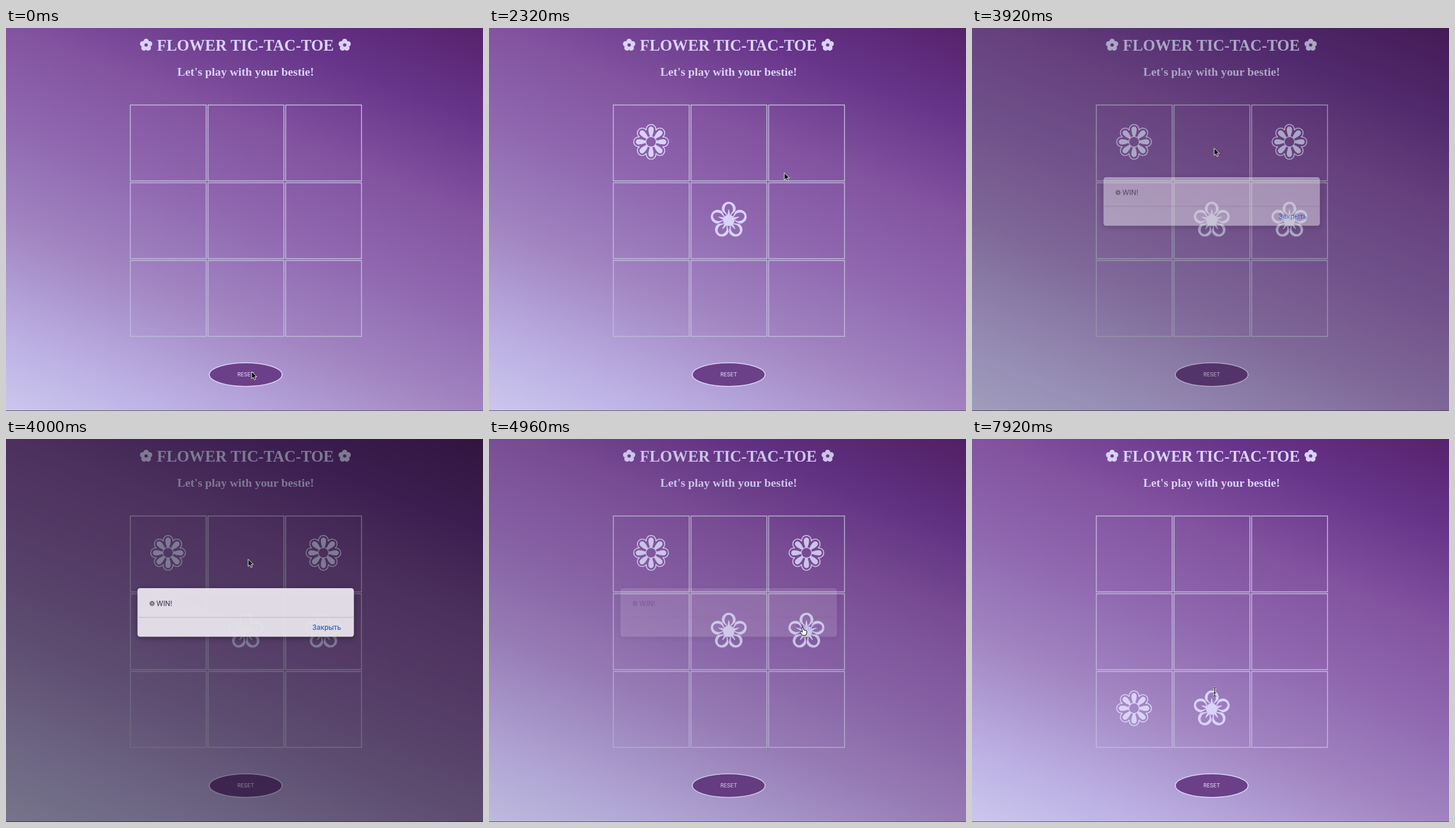
Write an HTML page that moves like this. It is 800 by 642 pixels and loops after 8 s.

```html
<!DOCTYPE html>
<html lang="en">
<head>
<meta charset="utf-8">
<title>Flower Tic-Tac-Toe</title>
<style>
  html, body { margin: 0; width: 100%; height: 100%; overflow: hidden; }
  body {
    background: linear-gradient(22deg, #cbc7ee, #bdb2e4 12%, #a184c1 33%, #9068b0 50%,
      #82539f 67%, #66348a 84%, #57226b);
  }
  svg { display: block; width: 800px; height: 642px; }
  .title { font: bold 26.4px "Liberation Serif", serif; text-anchor: middle; }
  .subtitle { font: bold 19.8px "Liberation Serif", serif; text-anchor: middle; }
  .label { font: 9px Inter, sans-serif; text-anchor: middle; }
  .message { font: 11.5px Inter, sans-serif; }
  .close { font: 500 11.5px Inter, sans-serif; text-anchor: end; }
  #panel { filter: drop-shadow(0 2px 4px rgba(0, 0, 0, .45)); }
</style>
</head>
<body>
<svg viewBox="0 0 800 642">
  <defs>
    <g id="florette"></g>
    <g id="daisy"><circle r="8.8" fill="none" stroke="currentColor" stroke-width="1.5"/></g>
    <g id="blossom"><circle r="9.6"/></g>
  </defs>

  <g fill="#d9d2fa" color="#d9d2fa">
    <use href="#florette" x="235" y="28.5"/>
    <text class="title" x="401.5" y="38">FLOWER TIC-TAC-TOE</text>
    <use href="#florette" x="568" y="28.5"/>
    <text class="subtitle" x="402" y="80">Let's play with your bestie!</text>
    <g id="grid" fill="none" stroke="#bfbad9" stroke-width="1.5"></g>
    <g id="marks"></g>
  </g>

  <ellipse cx="402" cy="581" rx="61" ry="19.7" fill="#6b4088" stroke="#d9d2fa" stroke-width="1.6"/>
  <text class="label" x="402" y="584.3" fill="#e6dffb">RESET</text>
  <rect y="641" width="800" height="1" fill="#5c5469"/>

  <rect id="dim" width="800" height="642" fill-opacity=".42"/>
  <g id="panel">
    <rect x="220.5" y="250" width="363" height="81.5" rx="4.5" fill="#efebf2" fill-opacity=".92"/>
    <path d="M220.5 299H583.5" stroke="#b9b3bf"/>
    <use href="#daisy" transform="translate(245 275.7) scale(.155)" fill="#372a44" color="#372a44"/>
    <text class="message" x="252.3" y="279.8" fill="#372a44">WIN!</text>
    <text class="close" x="562" y="320" fill="#1f62de">Закрыть</text>
  </g>

  <g id="cursor">
    <path id="arrow" d="M0 0V13L3 10.3 5 15 7.4 14 5.4 9.4H9.4Z" transform="scale(.92)" stroke="#fff"/>
    <path id="hand" d="M-1.2 0Q0-1.3 1.2 0L2 4 6 5Q7.5 6 7 9L5.5 13H-.5L-4.3 7.6Q-4.4 6 -2.8 6.3L-.6 8Z"
      fill="#fff" stroke="#000"/>
    <g id="beam" fill="none">
      <path id="stem" d="M-3-7Q0-7 0-5Q0-7 3-7M0-5V6M-3 7Q0 7 0 5Q0 7 3 7M-2 1.5H2" stroke="#fff" stroke-width="3"/>
      <use href="#stem" style="filter: brightness(0)" transform="scale(.9)" opacity="0"/>
      <path d="M-3-7H3M0-7V7M-3 7H3M-2 1.5H2" stroke="#000" stroke-width="1.2"/>
    </g>
  </g>
</svg>
<script>
const $ = id => document.getElementById(id);
const LOOP = 8000, STEP = 80, TRAVEL = 640, PITCH = 130.3;
const ALERT = { open: 3840, close: 4800, gone: 5040 };
const RESET_AT = 6080;

function add(parent, tag, attrs) {
  const node = document.createElementNS("http://www.w3.org/2000/svg", tag);
  for (const key in attrs) node.setAttribute(key, attrs[key]);
  return parent.appendChild(node);
}

function ring(id, count, d, attrs = {}) {
  for (let i = 0; i < count; i++)
    add($(id), "path", { d, transform: `rotate(${i * 360 / count})`, ...attrs });
}

// Petal pointing up: narrow at the base, round at the tip.
function petal(base, baseWidth, belly, width, tip) {
  const shoulder = (base + belly) / 2;
  return `M${-baseWidth}-${base}C${-width * .8}-${shoulder} ${-width}-${shoulder} ${-width}-${belly}` +
    `A${width} ${tip - belly} 0 0 1 ${width}-${belly}` +
    `C${width}-${shoulder} ${width * .8}-${shoulder} ${baseWidth}-${base}Z`;
}

ring("florette", 5, petal(1, .5, 6.2, 4.5, 10.6));
add($("florette"), "circle", { r: 2.8, fill: "#713f91" });

ring("daisy", 8, petal(9, 2, 21, 4.4, 25.6));
ring("daisy", 8, "M-8-19.4A8.15 8.15 0 1 1 8-19.4", { fill: "none", stroke: "currentColor", "stroke-width": 1.5 });

ring("blossom", 5, petal(9, 4, 19.5, 11.6, 31) + petal(9, 2, 19, 7, 27.5), { "fill-rule": "evenodd" });
ring("blossom", 5, "M-2.2-8L-.6-18H.6L2.2-8Z");

const cellCenter = cell => [271.8 + cell % 3 * PITCH, 191.5 + Math.floor(cell / 3) * PITCH];

for (let cell = 0; cell < 9; cell++) {
  const [x, y] = cellCenter(cell);
  add($("grid"), "rect", { x: x - 63.3, y: y - 62.4, width: 127.2, height: 127.2 });
}

// Each round alternates the two flowers at a steady pace.
const rounds = [
  { cells: [0, 4, 2, 5, 1], start: 1280, pace: 640, end: RESET_AT },
  { cells: [6, 7], start: 6800, pace: 720, end: LOOP }
];
const marks = rounds.flatMap(({ cells, start, pace, end }) => cells.map((cell, i) => {
  const [x, y] = cellCenter(cell);
  const click = start + i * pace;
  const from = click < ALERT.open ? click : Math.max(click, ALERT.gone);
  const node = add($("marks"), "use", { href: i % 2 ? "#blossom" : "#daisy", x, y: i % 2 ? y + .5 : y - .7 });
  return { x, y, click, from, end, node };
}));

const button = { x: 412, y: 576 };
const visits = [
  { t: 0, ...button },
  ...marks.map(({ x, y, click }) => ({ t: click, x: x + 4, y: y + 10 })),
  { t: 4720, x: 526, y: 316 },
  { t: RESET_AT, ...button },
  { t: 6400, x: 380, y: 441 },
  { t: 7920, x: 407, y: 424, travel: 160 }
].sort((a, b) => a.t - b.t);

const clamp = v => Math.min(1, Math.max(0, v));
const smooth = p => p * p * (3 - 2 * p);

function cursorAt(t) {
  const i = visits.findIndex(visit => visit.t > t);
  if (i < 0) return visits[visits.length - 1];
  const a = visits[i - 1], b = visits[i];
  const leave = Math.max(a.t, b.t - (b.travel || TRAVEL));
  const p = smooth(clamp((t - leave) / (b.t - leave)));
  return { x: a.x + (b.x - a.x) * p, y: a.y + (b.y - a.y) * p };
}

function draw(t) {
  const { x, y } = cursorAt(t);
  const alertLevel = clamp((t - ALERT.open) / 160) * clamp(1 - (t - ALERT.close) / 190);
  let kind = "arrow";
  for (const mark of marks) {
    const shown = t >= mark.from && t < mark.end;
    mark.node.style.display = shown ? "" : "none";
    if (shown && Math.hypot(x - mark.x, y - mark.y) < 30) kind = "beam";
  }
  if (alertLevel > 0) kind = x > 510 ? "hand" : "arrow";

  $("dim").setAttribute("opacity", alertLevel);
  $("panel").setAttribute("opacity", alertLevel);
  for (const id of ["arrow", "hand", "beam"]) $(id).style.display = id === kind ? "" : "none";
  $("cursor").setAttribute("transform", `translate(${x} ${y})`);
}

const start = performance.now();
function tick() {
  const t = (performance.now() - start) % LOOP;
  draw(Math.floor(t / STEP) * STEP);
  requestAnimationFrame(tick);
}
tick();
</script>
</body>
</html>
```
